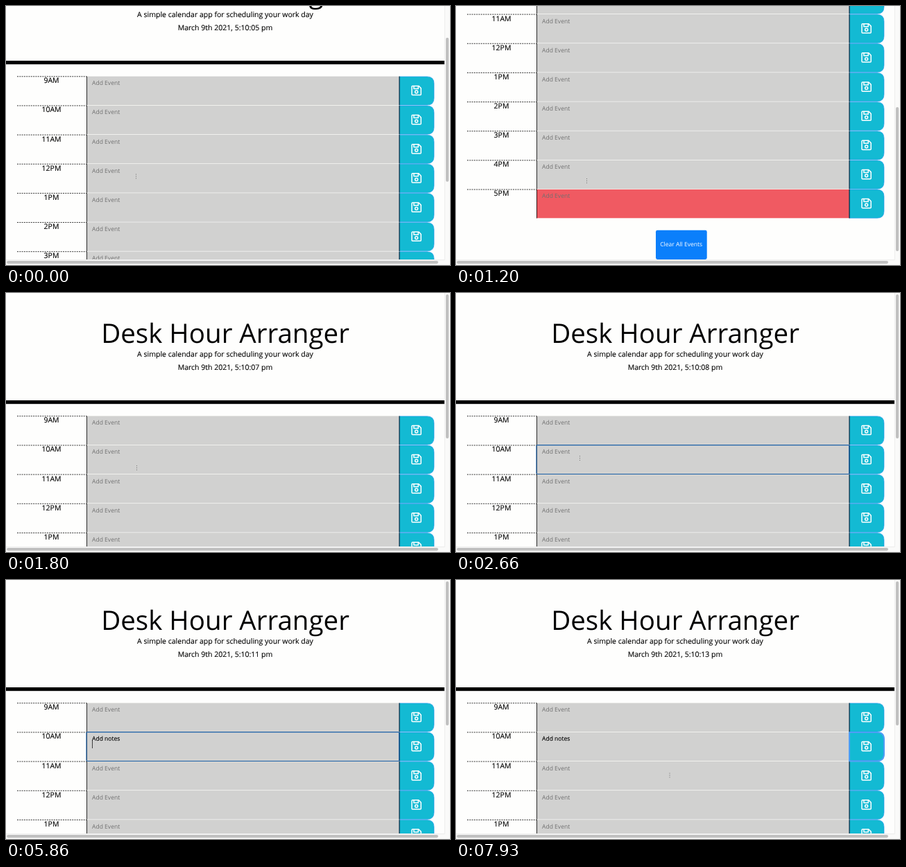
An HTML page that plays this animation: 640 by 374 pixels, repeating every 8000 ms.

```html
<!DOCTYPE html>
<html lang="en">
<head>
<meta charset="utf-8">
<title>Day planner</title>
<style>
  html, body { margin: 0; width: 100%; height: 100%; overflow: hidden; background: #fefefd; }
  svg { display: block; width: 640px; height: 374px; }
  text { font-family: "Open Sans", "Noto Sans", sans-serif; text-rendering: geometricPrecision; white-space: pre; }
  .mid { text-anchor: middle; }
  .body { font-size: 10.54px; stroke: #000; stroke-width: .12; }
  .small { font-size: 8.55px; }
  .hint { fill: #707070; }
  .typed { fill: #000; stroke: #000; stroke-width: .12; }
  .icon { fill: none; stroke: #fff; stroke-width: 1.5; stroke-linejoin: round; }
  .ring { fill: none; }
</style>
</head>
<body>
<svg viewBox="0 0 640 374">
  <defs>
    <clipPath id="view"><rect width="632" height="366.3"/></clipPath>
    <g id="disk" class="icon">
      <path d="M-5.6 -6.6H3.2L6.6 -3.2V5.6Q6.6 6.6 5.6 6.6H-5.6Q-6.6 6.6 -6.6 5.6V-5.6Q-6.6 -6.6 -5.6 -6.6Z"/>
      <path d="M-3.7 -6.4V-2.6H2.6V-6.4"/>
      <circle cy="2" r="2"/>
    </g>
    <path id="save" d="M567 .3H607Q617 .3 617 10.3V31.5Q617 41.5 607 41.5H567Z"/>
  </defs>
  <rect width="640" height="374" fill="#fefefd"/>
  <g clip-path="url(#view)">
    <g id="page">
      <text class="mid" x="316" y="71.7" font-size="38.5">Desk Hour Arranger</text>
      <text class="mid body" x="316" y="92.3">A simple calendar app for scheduling your work day</text>
      <text class="mid body" x="316" y="111.2" id="clock"></text>
      <rect y="155" width="632" height="5.2"/>
      <g id="rows"></g>
      <rect x="288" y="573.8" width="73.7" height="42.2" rx="2.4" fill="#0b7ffb"/>
      <text class="mid small" x="324.7" y="596.6" fill="#fff">Clear All Events</text>
      <rect id="fieldRing" class="ring" x="116" y="219.7" width="450.8" height="41.8" rx="1.5" stroke="#1b5fa6" stroke-width="1.2"/>
      <use id="saveRing" class="ring" href="#save" y="219.75" stroke="#4f9df5" stroke-width="2"/>
      <rect id="caret" width=".7" height="12"/>
    </g>
    <g id="mouse" fill="#6d6d6d">
      <rect x="-.5" y="-3.4" width="1" height="1"/>
      <rect x="-.5" y="-.5" width="1" height="1"/>
      <rect x="-.5" y="2.4" width="1" height="1"/>
    </g>
  </g>
  <path d="M632 0H640V374H0V366.3H632Z" fill="#fafaf9"/>
  <path d="M632.4 0V366.6H0" fill="none" stroke="#e9e9e8" stroke-width=".7"/>
  <rect id="thumb" x="634" y="2" width="4.2" height="208" rx="2.1" fill="#c0c0c0"/>
  <rect x="1" y="368" width="622" height="4.2" rx="2.1" fill="#c0c0c0"/>
</svg>
<script>
  const LOOP = 8000, TICK = 200 / 3, ROW = 42.15, TOP = 177.6;
  const MAX_SCROLL = 250;
  const NOTE = 'Add notes';
  const KEYS = [3460, 3800, 3860, 3930, 4000, 4130, 4200, 4260, 4330];
  const ENTER = 4730, FOCUS = 2060, SAVE = 7260;
  const CARET_ON = [[FOCUS, 2530], [3060, 5260], [5730, 6400], [6860, SAVE]];
  const $ = id => document.getElementById(id);

  function rowMarkup(i) {
    const hour = 9 + i;
    const label = (hour > 12 ? hour - 12 : hour) + (hour < 12 ? 'AM' : 'PM');
    return `<g transform="translate(0 ${TOP + i * ROW})">
      <path d="M16 .2H116" stroke="#000" stroke-width=".8" stroke-dasharray="2 1.3"/>
      <text class="mid body" x="65.5" y="9.6">${label}</text>
      <rect x="116" width="451" height="41.5" fill="${hour === 17 ? '#f05a62' : '#d1d1d0'}"/>
      <rect x="116" width=".8" height="41.7"/>
      <text class="small hint" id="note${i}" x="124" y="12.7">Add Event</text>
      <use href="#save" fill="#13bad3" stroke="#2b93ee" stroke-width=".6"/>
      <rect x="566.6" width=".9" height="41.7"/>
      <use href="#disk" x="591.6" y="20.4"/>
    </g>`;
  }
  $('rows').innerHTML = Array.from({ length: 9 }, (_, i) => rowMarkup(i)).join('');
  const note = $('note1');

  const show = (el, on) => el.setAttribute('visibility', on ? 'visible' : 'hidden');
  const clamp = v => Math.min(1, Math.max(0, v));
  const ease = v => v * v * (3 - 2 * v);
  const glide = (t, start, end, from, to) => {
    const k = ease(clamp((t - start) / (end - start)));
    return from.map((v, i) => v + (to[i] - v) * k);
  };

  function scrollAt(t) {
    if (t < 1230) return MAX_SCROLL - 174 * (1 - clamp(t / 730)) ** 2;
    return 106 * Math.max(0, 25 - t / TICK) ** 2 / 25;
  }

  function mouseAt(t) {
    if (t < 1800) return glide(t, 0, 130, [187.5, 246], [188.5, 252.5]);
    if (t < 6400) return glide(t, 1800, FOCUS, [188.5, 252.5], [178.5, 238.5]);
    if (t < SAVE) return glide(t, 6400, 7060, [178.5, 238.5], [591, 240]);
    return glide(t, 7330, 7900, [591, 240], [308, 282]);
  }

  function render(time) {
    const t = Math.floor((time + 6.7) / TICK) * TICK;
    const at = ms => time >= ms;

    const scroll = scrollAt(t);
    $('page').setAttribute('transform', `translate(0 ${-scroll})`);
    $('thumb').setAttribute('y', 2 + scroll * 0.576);

    const second = 5 + Math.floor((time + 470) / 1000);
    $('clock').textContent = `March 9th 2021, 5:10:${String(second).padStart(2, '0')} pm`;
    show($('clock'), !at(1260) || at(1400));

    const typed = KEYS.filter(at).length;
    note.textContent = typed ? NOTE.slice(0, typed) : 'Add Event';
    note.setAttribute('class', typed ? 'small typed' : 'small hint');

    const caret = $('caret');
    const newLine = at(ENTER);
    const advance = typed && !newLine ? note.getComputedTextLength() : 0;
    caret.setAttribute('x', 124.2 + advance);
    caret.setAttribute('y', newLine ? 231 : 223.2);
    show(caret, CARET_ON.some(([on, off]) => at(on) && !at(off)));

    show($('fieldRing'), at(FOCUS) && !at(SAVE));
    show($('saveRing'), at(SAVE));
    $('saveRing').setAttribute('opacity', clamp((t - SAVE + 70) / 150));

    const [x, y] = mouseAt(t);
    $('mouse').setAttribute('transform', `translate(${x} ${y})`);
    show($('mouse'), x < 566 && (!at(KEYS[0]) || at(6400)));
  }

  const start = performance.now();
  function frame() {
    render((performance.now() - start) % LOOP);
    requestAnimationFrame(frame);
  }
  frame();
</script>
</body>
</html>
```
